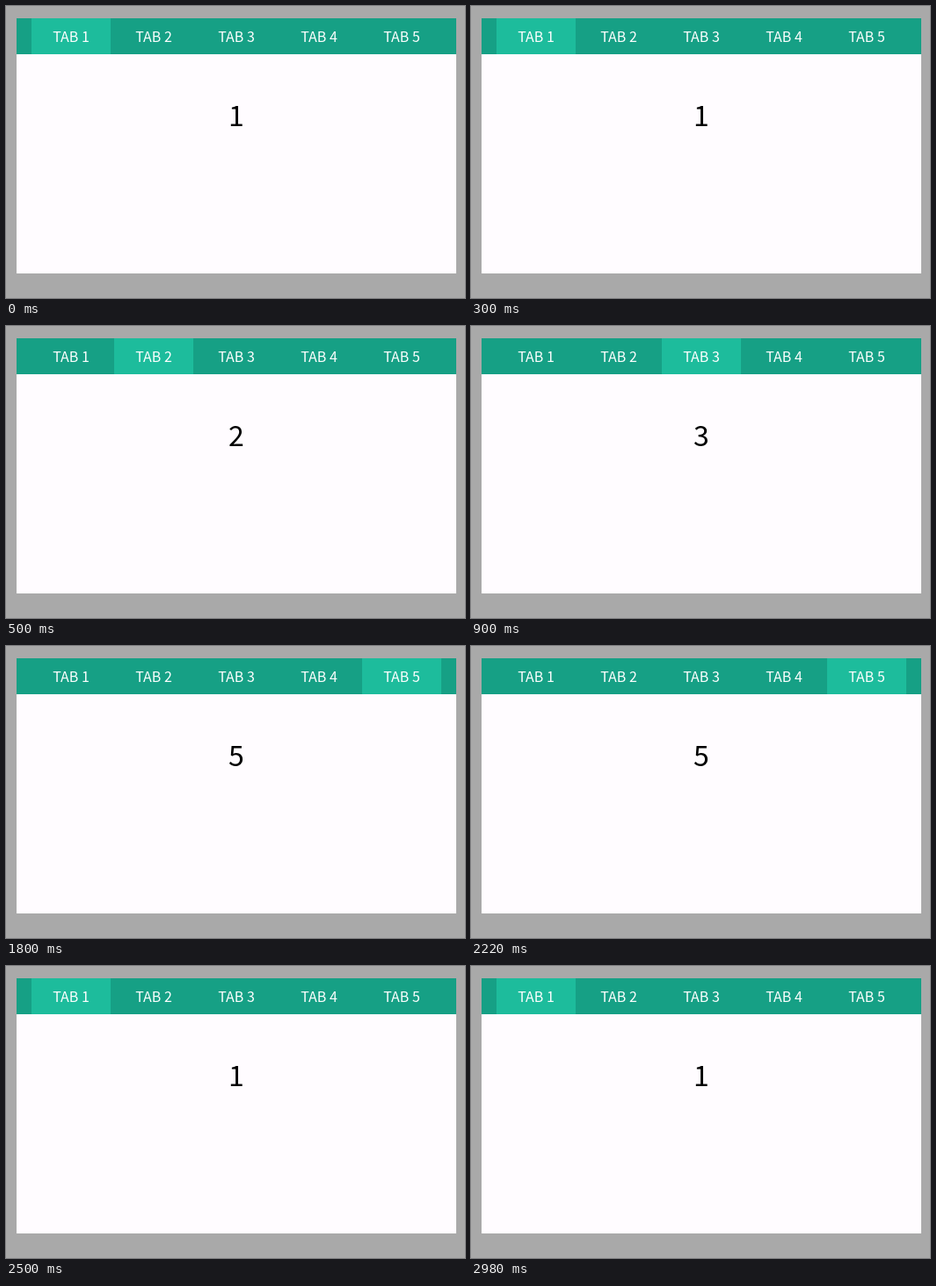
Recreate the animation shown at these times as an HTML page. Size 522 px wide and 333 px high, loop 3.3 s.

```html
<!DOCTYPE html>
<html lang="en">
<head>
<meta charset="utf-8">
<title>Tabs</title>
<style>
  html, body { margin: 0; width: 100%; height: 100%; overflow: hidden; background: #a9a9a9; }
  svg { display: block; width: 522px; height: 333px; }
  text { font-family: "Noto Sans CJK SC", "Noto Sans CJK JP", "Noto Sans", sans-serif; text-anchor: middle; }
  .label { font-size: 16px; fill: #fff; }
  #page { font-size: 32px; fill: #000; }
</style>
</head>
<body>
<svg viewBox="0 0 522 333">
  <rect width="522" height="333" fill="#a9a9a9"/>
  <rect x="12" y="14" width="500" height="291" fill="#fffcff"/>
  <rect x="12" y="14" width="500" height="41" fill="#16a085"/>
  <rect id="active" y="14" width="90" height="41" fill="#1dbc9c"/>
  <g id="labels"></g>
  <text id="page" x="262" y="137"></text>
</svg>
<script>
const LOOP = 3300, FIRST_X = 29, STEP = 94, TAB_WIDTH = 90;
const switches = [[0, 1], [500, 2], [900, 3], [1300, 4], [1800, 5], [2500, 1]];
const byId = id => document.getElementById(id);
const tabX = n => FIRST_X + (n - 1) * STEP;

for (let n = 1; n <= 5; n++) {
  const label = document.createElementNS(byId("labels").namespaceURI, "text");
  label.setAttribute("class", "label");
  label.setAttribute("x", tabX(n) + TAB_WIDTH / 2);
  label.setAttribute("y", 41);
  label.textContent = `TAB ${n}`;
  byId("labels").append(label);
}

function render(time) {
  const t = time % LOOP;
  const [, tab] = switches.findLast(([start]) => start <= t);
  byId("active").setAttribute("x", tabX(tab));
  byId("page").textContent = tab;
}

const began = performance.now();
function tick() {
  render(performance.now() - began);
  requestAnimationFrame(tick);
}
tick();
</script>
</body>
</html>
```
